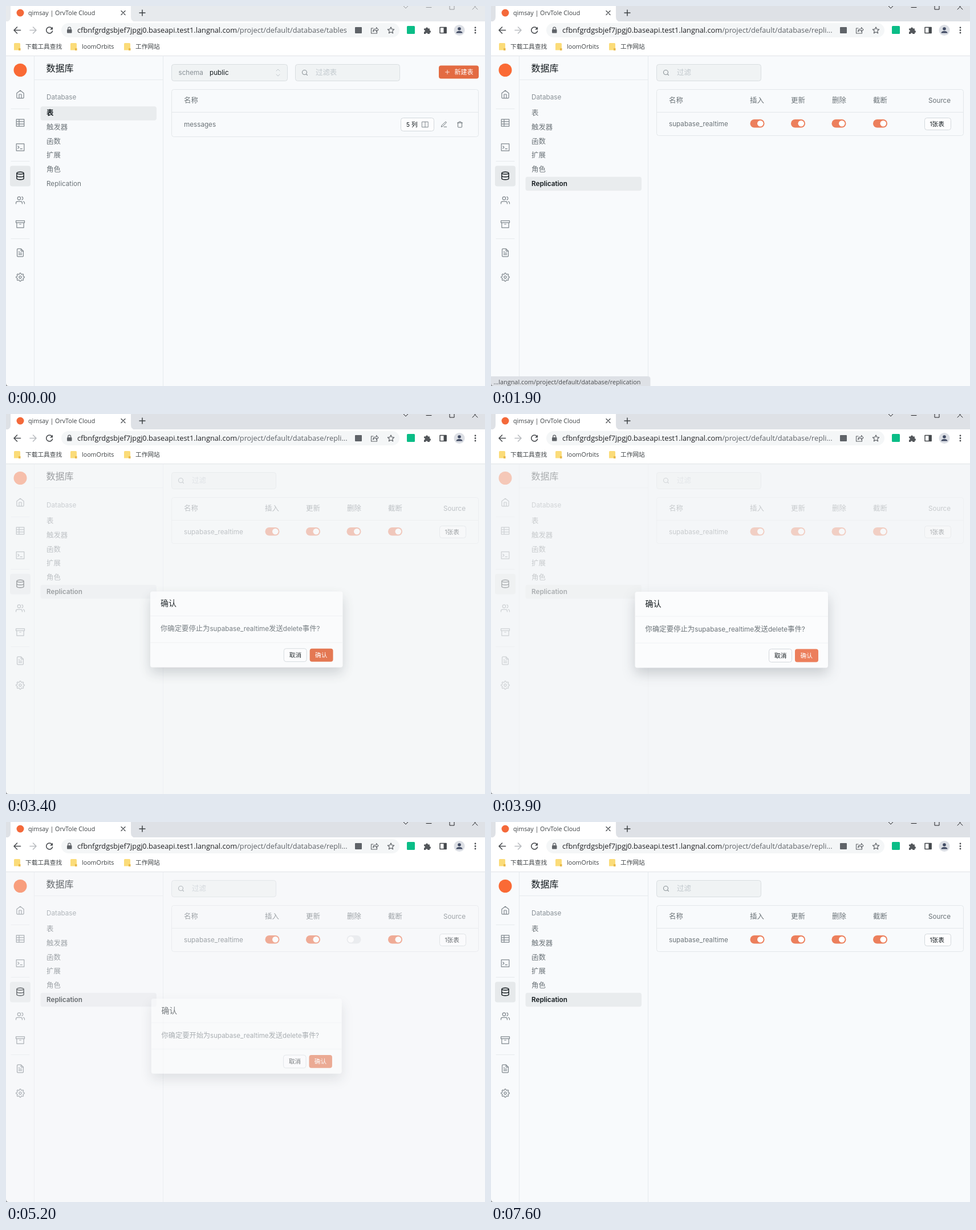
Write an HTML page that moves like this. It is 840x667 px and loops after 8 s.

```html
<!DOCTYPE html>
<html lang="zh-CN">
<head>
<meta charset="utf-8">
<title>Replication</title>
<style>
html, body { margin: 0; width: 100%; height: 100%; overflow: hidden; background: #f8fafc; }
svg { display: block; width: 840px; height: 667px; }
text { white-space: pre; }
.ui { font-family: "Open Sans", "Noto Sans CJK SC", "Noto Sans CJK", sans-serif; }
.app { font-family: Inter, "Noto Sans CJK SC", "Noto Sans CJK", sans-serif; }
.line { fill: none; stroke-linecap: round; stroke-linejoin: round; }
#card { filter: drop-shadow(0 10px 11px rgba(30, 40, 50, .2)); }
</style>
</head>
<body>
<svg id="stage" viewBox="0 0 840 667"></svg>
<script>
const ORANGE = '#e36b42', SOFT = '#ec7f5c', GREY = '#6b7378', DARK = '#11181c', EDGE = '#e3e7ea', CHROME = '#5f6368';

const rect = (x, y, w, h, fill, more = '') =>
  `<rect x="${x}" y="${y}" width="${w}" height="${h}" fill="${fill}" ${more}/>`;
const dot = (x, y, r, fill) => `<circle cx="${x}" cy="${y}" r="${r}" fill="${fill}"/>`;
const line = (d, stroke = EDGE, width = 1, more = '') =>
  `<path class="line" d="${d}" stroke="${stroke}" stroke-width="${width}" ${more}/>`;
const box = (x, y, w, h, fill, stroke, more = '') =>
  rect(x + .5, y + .5, w - 1, h - 1, fill, `rx="4" stroke="${stroke}" ${more}`);
const icon = (x, y, scale, d, stroke = '#7e868c', width = 1.2, more = '') =>
  `<g transform="translate(${x} ${y}) scale(${scale}) translate(-12 -12)">${line(d, stroke, width / scale, more)}</g>`;

// Latin runs are set slightly smaller than the CJK characters in the page.
const label = (x, y, str, fill = GREY, size = 12.4, weight = 400, more = '') =>
  `<text x="${x}" y="${y}" fill="${fill}" font-size="${size}" font-weight="${weight}" ${more}>` +
  str.replace(/[!-~]+/g, run => `<tspan font-size="${size * .944}">${run}</tspan>`) + '</text>';
const chromeText = (x, y, str, size = 10.7, fill = '#3c4043') =>
  `<text x="${x}" y="${y}" font-size="${size}" fill="${fill}">${str}</text>`;

const gear = Array.from({ length: 96 }, (_, i) => {
  const a = i / 96 * 2 * Math.PI, r = 9.4 + 1.4 * Math.tanh(2.2 * Math.cos(8 * a));
  return (i ? 'L' : 'M') + (12 + r * Math.cos(a)).toFixed(1) + ' ' + (12 + r * Math.sin(a)).toFixed(1);
}).join('') + 'zM9 12a3 3 0 1 0 6 0a3 3 0 1 0-6 0';

const TRASH = 'M3 6h18M19 6v14a2 2 0 0 1-2 2H7a2 2 0 0 1-2-2V6M8 6V4a2 2 0 0 1 2-2h4a2 2 0 0 1 2 2v2';
const sideIcons = [
  [155, 'M3 9l9-7 9 7v11a2 2 0 0 1-2 2H5a2 2 0 0 1-2-2zM9 22V12h6v10'],
  [205, 'M2 3h20v18H2zM2 9h20M2 15h20M9 3v18'],
  [248, 'M2 3h20v18H2zM6 9l3 3-3 3M12 16h5'],
  [298, 'M3 5a9 3 0 1 0 18 0a9 3 0 1 0-18 0M21 12c0 1.7-4 3-9 3s-9-1.3-9-3M3 5v14c0 1.7 4 3 9 3s9-1.3 9-3V5'],
  [341, 'M17 21v-2a4 4 0 0 0-4-4H5a4 4 0 0 0-4 4v2M5 7a4 4 0 1 0 8 0a4 4 0 1 0-8 0M23 21v-2a4 4 0 0 0-3-3.9M16 3.1a4 4 0 0 1 0 7.8'],
  [383, 'M21 8v13H3V8M1 3h22v5H1zM10 12h4'],
  [433, 'M14 2H6a2 2 0 0 0-2 2v16a2 2 0 0 0 2 2h12a2 2 0 0 0 2-2V8zM14 2v6h6M16 13H8M16 17H8M10 9H8'],
  [476, gear]
];

const folder = x => `<path d="M${x} 66.500q0-1.500 1.500-1.500h8q1.500 0 1.500 1.500v11h-11z" fill="#fbdc79"/>` +
  `<path d="M${x + 8} 74h3.500v4h-3.500z" fill="#e9b94a"/>`;

const browser = () => `<g class="ui">
  ${rect(0, 0, 840, 28, '#dee1e6', 'id="strip"')}
  <path d="M0 28Q8 27 8 19V0H219V19Q219 27 227 28z" fill="#fff"/>
  ${rect(0, 27, 840, 60, '#fff')}
  ${dot(25, 12, 6.5, '#f4693a')}
  ${chromeText(39, 16, 'qimsay | OrvTole Cloud')}
  ${line('M202 8.500l7 7m0-7l-7 7', '#45494d', 1.3)}
  ${line('M234 12h10M239 7v10', '#3c4043', 1.5)}
  <g id="controls">${line('M697 0l4 4 4-4M737 2.500h9M778 0v6h8V0M818 6l4.500-4.500L827 6M819-2l3.500 3.500L826-2', 'currentColor', 1)}</g>
  ${rect(97, 30, 593, 25, '#f1f3f4', 'rx="12.5" opacity=".75"')}
  ${line('M25.500 42.500h-11M19.500 37l-5.500 5.500 5.500 5.500', '#4a4d51', 1.6)}
  ${line('M42 42.500h11M47.500 37l5.500 5.500-5.500 5.500', '#b9bcc0', 1.6)}
  ${line('M80.500 39a5.500 5.500 0 1 0 1 5', '#4a4d51', 1.6)}
  <path d="M82 36.500v5h-5z" fill="#4a4d51"/>
  ${rect(107, 41, 8.5, 6.5, CHROME, 'rx="1"')}${line('M108.800 41v-1.500a2.400 2.400 0 0 1 4.800 0V41', CHROME, 1.3)}
  <text x="125" y="46.500" font-size="12.78" fill="#202124">cfbnfgrdgsbjef7jpgj0.baseapi.test1.langnal.com<tspan id="path" fill="${CHROME}"></tspan></text>
  ${rect(612, 37, 12, 11, CHROME, 'rx="1"')}
  ${line('M644 39h-3.500v9h10v-2.500M643.500 45q.5-5 6-5v-2.500l3.500 4-3.500 3.500v-2.500q-4 0-6 2.500z', CHROME, 1.1)}
  ${line('M675 37l1.700 3.700 4 .4-3 2.700.9 4-3.600-2.100-3.600 2.100.9-4-3-2.700 4-.4z', CHROME, 1.2)}
  ${rect(703, 35, 14, 14, '#0bbd87', 'rx="1.5"')}
  <path d="M733 39.500h3a2 2 0 1 1 4 0h3v3.500a2 2 0 1 1 0 4v2h-3.500a1.800 1.800 0 0 0-3.600 0H733v-3.500a1.800 1.800 0 0 0 0-3.600z" fill="#53575b"/>
  ${line('M761 37.500h11v10h-11z', '#45494d', 1.5)}${rect(767.5, 37, 5, 11, '#45494d')}
  ${dot(795, 42.500, 9.5, '#dcdfe5')}${dot(795, 40, 2.8, '#414b63')}<path d="M789.500 47.500q0-3.500 5.500-3.500t5.500 3.500z" fill="#414b63"/>
  ${[38, 42.500, 47].map(y => dot(823, y, 1.4, '#4a4d51')).join('')}
  ${folder(14)}${chromeText(34, 75, '下载工具查找')}
  ${folder(113)}${chromeText(133, 75, 'loomOrbits')}
  ${folder(207)}${chromeText(227, 75, '工作网站')}
  ${line('M0 87.500H840', '#e0e3e7')}
</g>`;

const navItems = ['表', '触发器', '函数', '扩展', '角色', 'Replication'];
const navY = i => 176.3 + 24.75 * i;

const sidebar = () => `
  ${line('M49.500 88V667M275.500 88V667M50 129.500H275M9 180.500H41M9 272.500H41M9 408.500H41', '#e6eaed')}
  ${rect(7, 280.5, 36, 36, '#e6e9eb', 'rx="4"')}
  ${dot(25, 112.500, 11.5, '#fa6a35')}
  ${sideIcons.map(([y, d]) => icon(25, y, .68, d, y === 298 ? DARK : undefined, y === 298 ? 1.4 : 1.2)).join('')}
  ${label(70.5, 114.500, '数据库', DARK, 16)}
  ${label(71, 163.500, 'Database', '#889096')}
  ${rect(60.5, navY(0), 203.5, 24.5, '#e9ecee', 'id="pick" rx="4"')}
  ${navItems.map((s, i) => label(71, navY(i) + 15.8, s, GREY, 12.4, 400, 'class="nav"')).join('')}`;

const filter = (x, hint) => box(x, 102, 184, 30, '#f0f3f4', '#d9dee1') +
  icon(x + 17, 117, .5, 'M3 11a8 8 0 1 0 16 0a8 8 0 1 0-16 0M21 21l-4.300-4.300', '#8b9398', 1.1) +
  label(x + 36, 121, hint, '#c1c8cd');
const frame = bottom => box(290, 146, 539, bottom - 146, 'none', EDGE) + line('M291 186.500H828');

const tablesView = () => `<g id="tables">
  ${box(290, 102, 204, 30, '#f0f3f4', '#d9dee1')}
  ${label(302.5, 121, 'schema', '#889096')}${label(357, 121, 'public', DARK)}
  ${line('M474 114l3-3 3 3M474 120l3 3 3-3', '#c1c8cd')}
  ${filter(507, '过滤表')}
  ${rect(759, 104.5, 70, 23, ORANGE, 'id="create" rx="4"')}
  ${line('M770.500 116h7M774 112.500v7', '#fbe0d6')}
  ${label(786.5, 120, '新建表', '#fff', 11, 500)}
  ${frame(230)}
  ${label(312, 170, '名称')}${label(312, 211.500, 'messages')}
  ${box(692, 196, 59, 24, '#fdfdfe', '#d3d8dc')}
  ${label(702, 212, '5 列', DARK, 10.7)}
  ${icon(735, 208, .52, 'M2 3h20v18H2zM12 3v18', '#7e868c', 1)}
  ${icon(768, 208, .52, 'M12 20h9M16.500 3.500a2.100 2.100 0 0 1 3 3L7 19l-4 1 1-4z', '#6b7378', 1)}
  ${icon(796, 208, .5, TRASH, 'currentColor', 1, 'id="trash"')}
</g>`;

const toggle = (x, id = '') => `<g ${id && `id="${id}"`}>${rect(x, 199, 25, 14.5, SOFT, 'rx="7.2"')}${dot(x + 17.8, 206.200, 5.3, '#fff')}</g>`;

const replicationView = () => `<g id="replication">
  ${filter(290, '过滤')}${frame(228)}
  ${label(312, 170, '名称')}
  ${['插入', '更新', '删除', '截断'].map((s, i) => label(454 + 72 * i, 170, s)).join('')}
  ${label(767, 170, 'Source')}${label(312, 210.500, 'supabase_realtime')}
  ${[454.5, 526, 597.5, 670].map((x, i) => toggle(x, i === 2 ? 'del' : '')).join('')}
  ${box(760, 196, 47, 22, '#fdfdfe', '#d3d8dc')}${label(769.5, 211, '1张表', DARK, 10.7)}
</g>`;

const modal = () => `
  ${rect(0, 88, 840, 579, '#f3f5f7', 'id="veil"')}
  <g id="modal">
    ${rect(252.5, 312, 338.5, 133.5, '#fbfcfd', 'id="card" rx="4"')}
    ${line('M253 355H590.500M253 402H590.500', '#eff2f4')}
    ${label(270.5, 338, '确认', DARK, 14)}
    <g id="question"></g>
    <g id="cancel">${box(487, 412, 41, 24, '#fdfdfe', '#d3d8dc')}${label(497, 427.500, '取消', DARK, 10.7, 500)}</g>
    ${rect(533, 412.5, 41, 23, ORANGE, 'id="ok" rx="4"')}
    ${label(542.5, 427.500, '确认', '#fff', 10.7, 500)}
    <circle id="spin" cx="530" cy="424" r="4" fill="none" stroke="#fbd9cd" stroke-width="2" stroke-dasharray="1 2.14"/>
  </g>`;

const status = () => `<g id="status" class="ui">
  <path d="M0 650H275Q279.500 650 279.500 654.500V667H0z" fill="#dee1e6"/>
  ${chromeText(4.5, 663.500, '...langnal.com/project/default/database/replication', 10.9, '#4a4d51')}
</g>`;

const stage = document.getElementById('stage');
stage.innerHTML = rect(0, 0, 840, 667, '#f8fafc') + browser() +
  `<g class="app">${sidebar()}${tablesView()}${replicationView()}${modal()}</g>` + status() +
  '<path d="M0 662Q0 667 5 667H0z" fill="#8d9094"/>';

const el = id => document.getElementById(id);
const set = (node, attrs) => { for (const k in attrs) node.setAttribute(k, attrs[k]); };
const nav = [...document.querySelectorAll('.nav')];

// Each step overrides part of the state from its start time on.
const steps = [
  [0, { active: false, page: 'tables', pick: 0, link: GREY, create: ORANGE, trash: GREY, status: 0, show: 0, verb: '停止', ok: ORANGE, busy: false, on: 1 }],
  [500, { create: SOFT, trash: '#3c4449' }],
  [600, { create: ORANGE, trash: GREY }],
  [1000, { link: '#43494d' }],
  [1100, { link: DARK }],
  [1600, { active: true }],
  [1700, { pick: 5, page: 'none' }],
  [1800, { page: 'replication', status: 1 }],
  [2600, { status: .45 }],
  [2700, { status: 0 }],
  [3300, { show: .5 }],
  [3400, { show: .9 }],
  [3500, { show: .98 }],
  [3600, { show: 1 }],
  [3900, { ok: SOFT }],
  [4200, { busy: true }],
  [4300, { show: .55 }],
  [4400, { show: .12 }],
  [4500, { show: 0, on: .15 }],
  [4600, { on: 0 }],
  [5100, { show: .12, verb: '开始', ok: ORANGE, busy: false }],
  [5200, { show: .55 }],
  [5300, { show: .87 }],
  [5400, { show: .97 }],
  [5500, { show: 1 }],
  [5700, { ok: '#e87650' }],
  [5800, { ok: SOFT }],
  [6000, { busy: true }],
  [6200, { show: .55 }],
  [6300, { show: .1, on: .85 }],
  [6400, { show: 0, on: 1 }]
];

const mix = p => {
  const off = [228, 230, 233], on = [236, 127, 92];
  return `rgb(${off.map((v, i) => Math.round(v + (on[i] - v) * p))})`;
};

function render(t) {
  const s = Object.assign({}, ...steps.filter(([start]) => start <= t).map(step => step[1]));

  set(el('strip'), { fill: s.active ? '#dee1e6' : '#e7eaed' });
  set(el('controls'), { color: s.active ? '#202124' : '#96999d' });
  el('path').textContent = '/project/default/database/' + (s.page === 'tables' ? 'tables' : 'repli...');

  set(el('pick'), { y: navY(s.pick) - (s.pick ? .3 : 0) });
  nav.forEach((node, i) => set(node, {
    fill: i === s.pick ? DARK : i === 5 ? s.link : GREY,
    'font-weight': i === s.pick ? 600 : 400
  }));
  for (const id of ['tables', 'replication']) set(el(id), { display: s.page === id ? 'inline' : 'none' });
  set(el('create'), { fill: s.create });
  set(el('trash'), { color: s.trash });
  set(el('status'), { opacity: s.status });

  const [track, knob] = el('del').children;
  set(track, { fill: mix(s.on) });
  set(knob, { cx: s.on < .5 ? 604.7 : 615.3 });

  const scale = 1 - .03 * (1 - s.show);
  set(el('veil'), { opacity: .68 * s.show });
  set(el('modal'), {
    opacity: s.show,
    transform: `translate(421.75 ${378.75 - 6.5 * (1 - s.show)}) scale(${scale}) translate(-421.75 -378.75)`
  });
  if (el('question').dataset.verb !== s.verb) {
    el('question').dataset.verb = s.verb;
    el('question').innerHTML = label(270.5, 382, `你确定要${s.verb}为supabase_realtime发送delete事件?`, GREY);
  }
  set(el('cancel'), { transform: `translate(${s.busy ? -19.5 : 0} 0)` });
  set(el('ok'), { x: s.busy ? 514 : 533, width: s.busy ? 60 : 41, fill: s.ok, stroke: s.busy ? '#c9603c' : 'none' });
  set(el('spin'), { display: s.busy ? 'inline' : 'none', transform: `rotate(${t * .36 % 360} 530 424)` });
}

const begin = performance.now();
function tick() {
  render((performance.now() - begin) % 8000);
  requestAnimationFrame(tick);
}
tick();
</script>
</body>
</html>
```
